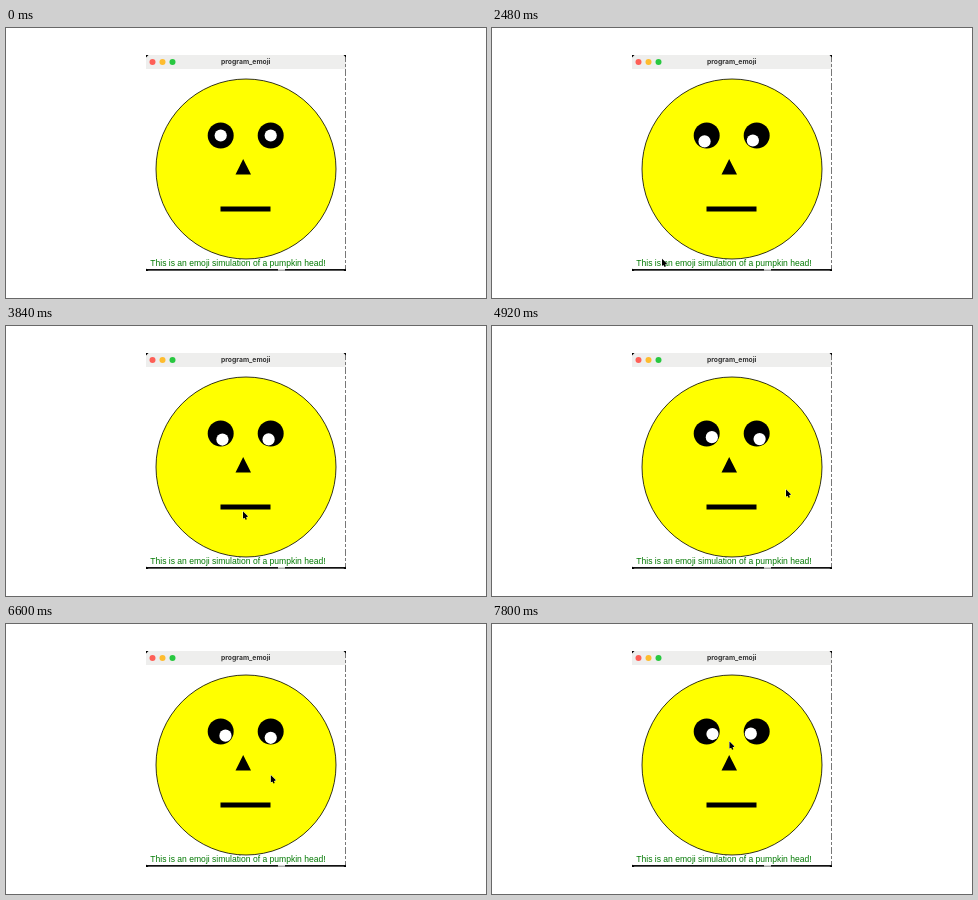
An HTML page with a canvas for the animation above (8 s loop, 480x270 px).

```html
<!DOCTYPE html>
<html>
<head>
<meta charset="utf-8">
<style>
html, body { margin: 0; height: 100%; overflow: hidden; background: #fff; }
canvas { display: block; }
</style>
</head>
<body>
<canvas id="stage" width="480" height="270"></canvas>
<script>
const ctx = document.getElementById('stage').getContext('2d');
const LOOP = 8000, STEP = 40, START = 520;
const LEFT = 140, TOP = 27, RIGHT = 340, BOTTOM = 243;
const EYE_Y = 107.5, GAZE = 6.3;

// The pointer rests between moves: start, end, x, y
const nudges = [1080, 1440, 2040].map((t, i) => [t, t + 80, 174 - 3 * i, 230 + i]);
const moves = [
  [520, 760, 177, 229],
  ...nudges,
  [2440, 3840, 237, 185.5],
  [3840, 4600, 294, 163.5],
  [5080, 5600, 319, 152],
  [5840, 6160, 289, 148.5],
  [6160, 7200, 232, 155],
  [7200, 7800, 237.5, 117.5]
];

function pointerAt(t) {
  let x = 335, y = 226;
  for (const [from, to, nx, ny] of moves) {
    const k = Math.min(1, Math.max(0, (t - from) / (to - from)));
    x += (nx - x) * k;
    y += (ny - y) * k;
  }
  return { x, y };
}

function rect(x, y, w, h, color) {
  ctx.fillStyle = color;
  ctx.fillRect(x, y, w, h);
}

function disc(x, y, r, color) {
  ctx.beginPath();
  ctx.arc(x, y, r, 0, Math.PI * 2);
  ctx.fillStyle = color;
  ctx.fill();
}

function outline(color, width) {
  ctx.strokeStyle = color;
  ctx.lineWidth = width;
  ctx.stroke();
}

function triangle(x1, y1, x2, y2, x3, y3) {
  ctx.beginPath();
  ctx.moveTo(x1, y1);
  ctx.lineTo(x2, y2);
  ctx.lineTo(x3, y3);
  ctx.closePath();
  ctx.fillStyle = '#000';
  ctx.fill();
}

function text(str, x, y, font, color, align) {
  ctx.font = font;
  ctx.fillStyle = color;
  ctx.textAlign = align;
  ctx.fillText(str, x, y);
}

function drawWindow() {
  rect(0, 0, 480, 270, '#fff');
  rect(LEFT, TOP, 200, 14, '#eeeeed');
  rect(LEFT, BOTTOM - 2, 200, 1.7, '#111');
  rect(272, BOTTOM - 2, 7, 1.7, '#ccc');

  // Ragged dark edge on the right
  ctx.beginPath();
  ctx.moveTo(RIGHT - 0.5, TOP);
  ctx.lineTo(RIGHT - 0.5, BOTTOM);
  ctx.setLineDash([7, 2, 3, 2]);
  outline('#777', 1);
  ctx.setLineDash([]);

  // Dark wedges behind the rounded corners
  for (const [x, dx] of [[LEFT, 2.5], [RIGHT, -2.5]])
    for (const [y, dy] of [[TOP, 2.5], [BOTTOM, -2.5]])
      triangle(x, y, x + dx, y, x, y + dy);

  ['#fe5f57', '#febc2e', '#28c840'].forEach((c, i) => disc(146.5 + 10 * i, 34, 3, c));
  text('program_emoji', 239.7, 36.4, '700 6.8px Inter, sans-serif', '#333', 'center');
}

function drawFace(pointer) {
  disc(240, 141, 90, '#ff0');
  outline('#000', 0.8);
  for (const x of [214.7, 264.7]) {
    disc(x, EYE_Y, 13, '#000');
    const a = pointer ? Math.atan2(pointer.y - EYE_Y, pointer.x - x) : 0;
    const r = pointer ? GAZE : 0;
    disc(x + r * Math.cos(a), EYE_Y + r * Math.sin(a), 6.1, '#fff');
  }
  triangle(237.2, 131, 245, 146.5, 229.5, 146.5);
  rect(214.5, 178.5, 50, 5, '#000');
}

function drawPointer({ x, y }) {
  ctx.save();
  ctx.translate(x, y);
  triangle(0, 0, 0, 7, 5, 5);
  outline('#fff', 0.8);
  triangle(0, 0, 0, 7, 5, 5);
  ctx.beginPath();
  ctx.moveTo(1.5, 4);
  ctx.lineTo(3.2, 8);
  outline('#000', 1.4);
  ctx.restore();
}

function draw(now) {
  const t = Math.floor(now % LOOP / STEP) * STEP;
  const pointer = t < START ? null : pointerAt(t);
  drawWindow();
  drawFace(pointer);
  text('This is an emoji simulation of a pumpkin head!', 144.3, 238.1,
    '8.56px "Liberation Sans", Arial, sans-serif', '#007800', 'left');
  if (pointer) drawPointer(pointer);
  requestAnimationFrame(draw);
}
requestAnimationFrame(draw);
</script>
</body>
</html>
```
